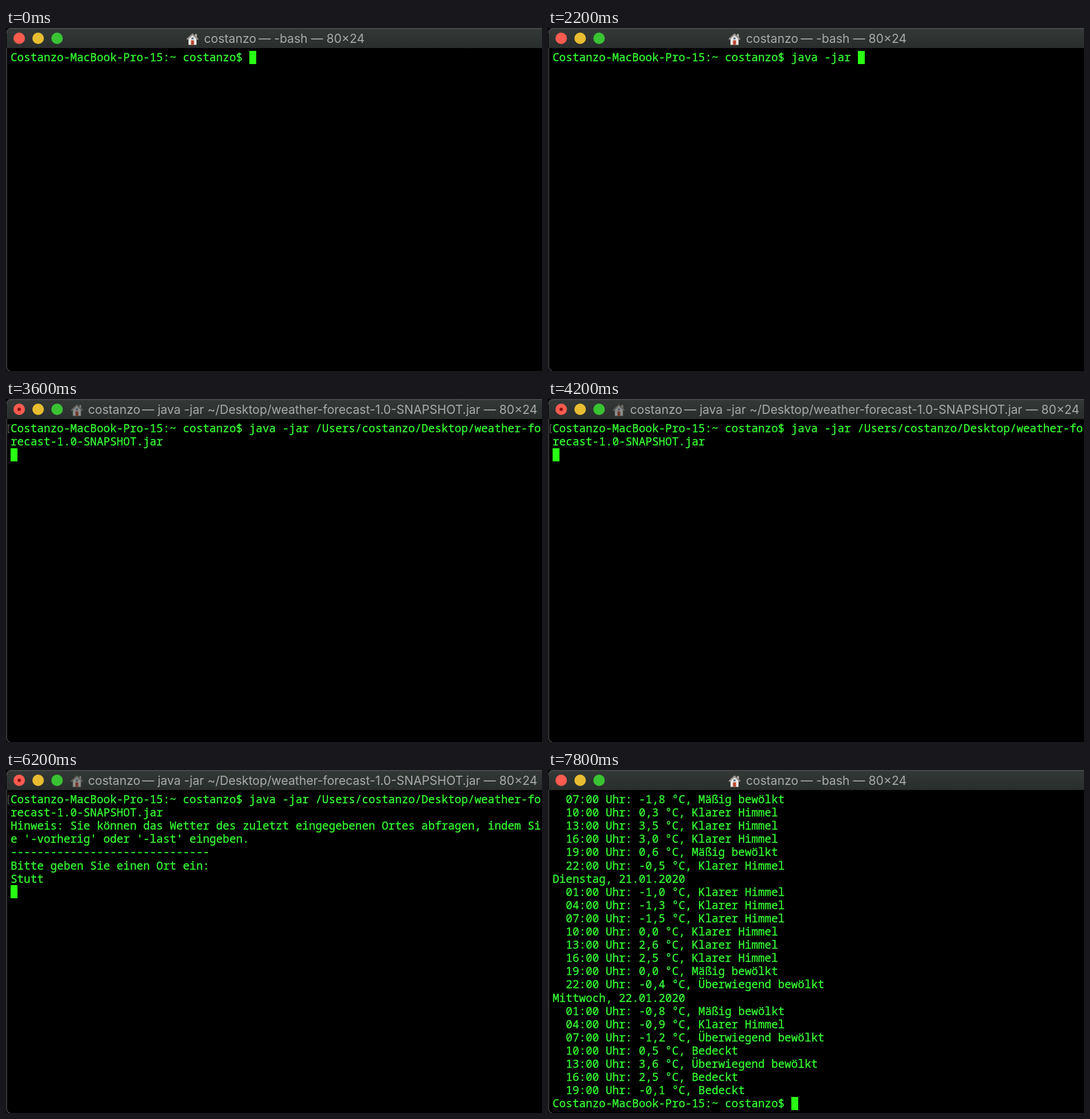
An HTML page for the animation above (8 s loop, 934x599 px).

```html
<!DOCTYPE html>
<html lang="de">
<head>
<meta charset="utf-8">
<title>Terminal</title>
<style>
  html, body { margin: 0; width: 100%; height: 100%; overflow: hidden; background: #000; }
  svg { display: block; width: 100%; height: 100%; }
  text { white-space: pre; }
  .mono { font: 19.26px "Noto Sans Mono", monospace; fill: #35fb32; stroke: #35fb32; stroke-width: 0.35; }
  .title { font: 21.1px Inter, sans-serif; fill: #a9abaa; }
  .label { font: 600 19.4px Inter, sans-serif; fill: #f1f3fb; text-anchor: middle; }
</style>
</head>
<body>
<svg viewBox="0 0 934 599">
  <defs>
    <linearGradient id="bar" x2="0" y2="1">
      <stop offset="0" stop-color="#343937"/><stop offset="1" stop-color="#292e2c"/>
    </linearGradient>
    <linearGradient id="paper" x2="0.3" y2="1">
      <stop offset="0" stop-color="#b4b4b4"/><stop offset="0.6" stop-color="#dedede"/><stop offset="1" stop-color="#eee"/>
    </linearGradient>
    <linearGradient id="china">
      <stop offset="0" stop-color="#d4d4d4"/><stop offset="0.5" stop-color="#bbb"/><stop offset="1" stop-color="#7c7c7c"/>
    </linearGradient>
  </defs>

  <rect width="934" height="599"/>
  <path d="M1.2 35V592Q1.2 598 7 599" fill="none" stroke="#484b4a" stroke-width="1.4"/>
  <path d="M1 35V8Q1 0 9 0H934V35Z" fill="url(#bar)"/>
  <path d="M1 9Q1 1 9 1H934" fill="none" stroke="#565a58"/>

  <circle cx="23" cy="18" r="10" fill="#fc5b50"/>
  <circle id="dot" cx="23" cy="18" r="3" fill="#8c120c"/>
  <circle cx="56" cy="18" r="10" fill="#e9bd31"/>
  <circle cx="89" cy="18" r="10" fill="#39c333"/>

  <g id="house">
    <path d="M3.5 10L10.5 4L17.5 10V21H3.5Z" fill="#e9e6e2"/>
    <path d="M15 2H18V9L15 6Z" fill="#b9b3ac"/>
    <path d="M0.8 11.5L10.5 2.5L20.2 11.5" fill="none" stroke="#96918c" stroke-width="2.4"/>
    <rect x="8" y="13" width="5" height="8" fill="#b8452f"/>
    <rect x="8.7" y="8" width="3.6" height="3.4" fill="#5b7893"/>
  </g>
  <text id="user" class="title" y="26">costanzo</text>
  <text id="job" class="title" y="26" text-anchor="end"></text>

  <path id="mark" d="M7 45H4V59H7" fill="none" stroke="#6b6f6b" stroke-width="1.2"/>
  <g id="rows"></g>
  <rect id="cursor"/>

  <g id="drop">
    <path d="M934 37.5H2.5V599" fill="none" stroke="#1f43bd" stroke-width="3"/>
    <g id="file">
      <path d="M715 109H763Q770 109 776 116L784 124Q789 129 789 136V207H715Z" fill="url(#paper)"/>
      <path d="M768 111Q772 121 769 129Q780 126 788 131Q782 120 768 111Z" fill="#f5f5f5" stroke="#8f8f8f" stroke-width="0.7"/>
      <ellipse cx="752" cy="164" rx="29.5" ry="14" fill="#929292"/>
      <ellipse cx="752" cy="162" rx="28.5" ry="12.5" fill="#d2d2d2"/>
      <ellipse cx="753" cy="164" rx="20" ry="8" fill="#999"/>
      <path d="M770 150C780 147 783 158 768 161" fill="none" stroke="#858585" stroke-width="3.4"/>
      <path d="M732 144C732 160 741 170 752 170S773 160 773 144Z" fill="url(#china)"/>
      <ellipse cx="752.5" cy="144" rx="20.5" ry="8.5" fill="#e2e2e2"/>
      <ellipse cx="752.5" cy="145" rx="17.5" ry="6.5" fill="#373737"/>
      <text x="752" y="202" text-anchor="middle" font-family="Lato, sans-serif" font-weight="700" font-size="15.5" fill="#484848">JAR</text>
      <rect x="701" y="223" width="101" height="30" rx="4" fill="#1b3db9"/>
      <rect x="652" y="249" width="200" height="28" rx="4" fill="#1b3db9"/>
      <text class="label" x="751.5" y="244">weather-</text>
      <text class="label" x="751.5" y="271">forecast...SHOT.jar</text>
      <path d="M781 172V195L786.2 190.4L790.2 199.6L794.4 197.8L790.4 188.8H797Z" fill="#000" stroke="#fff" stroke-width="1.7"/>
    </g>
  </g>
</svg>
<script>
const LOOP = 8000, STEP = 200, ROWS = 24, LEFT = 8, TOP = 39.7, CHAR = 11.556, LINE = 23.1;
const $ = id => document.getElementById(id);

const prompt = 'Costanzo-MacBook-Pro-15:~ costanzo$ ';
const command = 'java -jar ';
const call = [
  prompt + command + '/Users/costanzo/Desktop/weather-fo',
  'recast-1.0-SNAPSHOT.jar'
];
const intro = [
  "Hinweis: Sie können das Wetter des zuletzt eingegebenen Ortes abfragen, indem Si",
  "e '-vorherig' oder '-last' eingeben.",
  '-'.repeat(30),
  'Bitte geben Sie einen Ort ein:'
];
const query = 'Stutt';
const places = [
  'Stadtkreis Stuttgart (DE)', 'Stutterheim (ZA)', 'Regierungsbezirk Stuttgart (DE)',
  'Stuttgart (DE)', 'Stuttgart Feuerbach (DE)', 'Stuttgart Muehlhausen (DE)',
  'Stuttgart-Ost (DE)', 'Stuttgart (US)'
];
const found = [
  'Folgende Orte wurden gefunden, die auf Ihre Eingabe zutreffen:',
  ...places.map((name, i) => `${i + 1}: ${name}`),
  'Bitte wählen Sie einen Ort aus, indem Sie die entsprechende Zahl eingeben.'
];

const sky = { K: 'Klarer Himmel', M: 'Mäßig bewölkt', U: 'Überwiegend bewölkt', B: 'Bedeckt' };
const hours = (first, list) => list.split(' ').map((item, i) => {
  const hour = String(first + 3 * i).padStart(2, '0');
  return `  ${hour}:00 Uhr: ${item.slice(0, -1)} °C, ${sky[item.slice(-1)]}`;
});
const forecast = [
  ...hours(7, '-1,8M 0,3K 3,5K 3,0K 0,6M -0,5K'),
  'Dienstag, 21.01.2020',
  ...hours(1, '-1,0K -1,3K -1,5K 0,0K 2,6K 2,5K 0,0M -0,4U'),
  'Mittwoch, 22.01.2020',
  ...hours(1, '-0,8M -0,9K -1,2U 0,5B 3,6U 2,5B -0,1B'),
  prompt
];

const rows = Array.from({ length: ROWS }, (_, i) => {
  const row = document.createElementNS('http://www.w3.org/2000/svg', 'text');
  row.setAttribute('class', 'mono');
  row.setAttribute('x', LEFT);
  row.setAttribute('y', TOP + 18.3 + i * LINE);
  return $('rows').appendChild(row);
});

const set = (id, attrs) => {
  for (const key in attrs) $(id).setAttribute(key, attrs[key]);
};
const show = (id, on) => set(id, { visibility: on ? 'visible' : 'hidden' });
// One key per step, the first one at the start time
const typed = (word, t, start) => word.slice(0, Math.max(0, (t - start) / STEP + 1));

// Lines on screen; the cursor stands at the end of the last one
function screen(t) {
  if (t < 3200) return [prompt + typed(command, t, 200)];
  if (t < 3600) return [call[0], call[1] + ' '];
  if (t < 4400) return [...call, ''];
  if (t < 6200) return [...call, ...intro, typed(query, t, 5000)];
  const asked = [...call, ...intro, query];
  if (t < 6600) return [...asked, ''];
  if (t < 7400) return [...asked, ...found, ''];
  if (t < 7600) return [...asked, ...found, '4'];
  if (t < 7800) return [...asked, ...found, '4', ''];
  return forecast;
}

function draw(time) {
  const t = Math.floor(time % LOOP / STEP) * STEP;
  const lines = screen(t);
  rows.forEach((row, i) => { row.textContent = lines[i] || ''; });

  const last = lines.length - 1;
  const hollow = t >= 2400 && t < 3200;
  const inset = hollow ? 0.8 : 0;
  set('cursor', {
    x: Math.round(LEFT + lines[last].length * CHAR) + inset,
    y: Math.round(TOP + last * LINE) + inset,
    width: 12 - 2 * inset,
    height: 23 - 2 * inset,
    fill: hollow ? 'none' : '#28fe14',
    stroke: hollow ? '#32f52a' : 'none',
    'stroke-width': 1.6
  });

  const running = t >= 3600 && t < 7800;
  show('dot', running);
  show('mark', running);
  set('house', { transform: `translate(${running ? 113 : 314.5} 8.5)`, opacity: running ? 0.5 : 1 });
  set('user', { x: running ? 143 : 345 });
  set('job', { x: running ? 926 : 625 });
  $('job').textContent = running
    ? '— java -jar ~/Desktop/weather-forecast-1.0-SNAPSHOT.jar — 80×24'
    : '— -bash — 80×24';

  show('drop', t >= 2600 && t < 3200);
  const drag = (2800 - t) / STEP;
  set('file', { transform: `translate(${drag * 150} ${drag * 25})` });
}

function tick() {
  draw(performance.now());
  requestAnimationFrame(tick);
}
tick();
</script>
</body>
</html>
```
